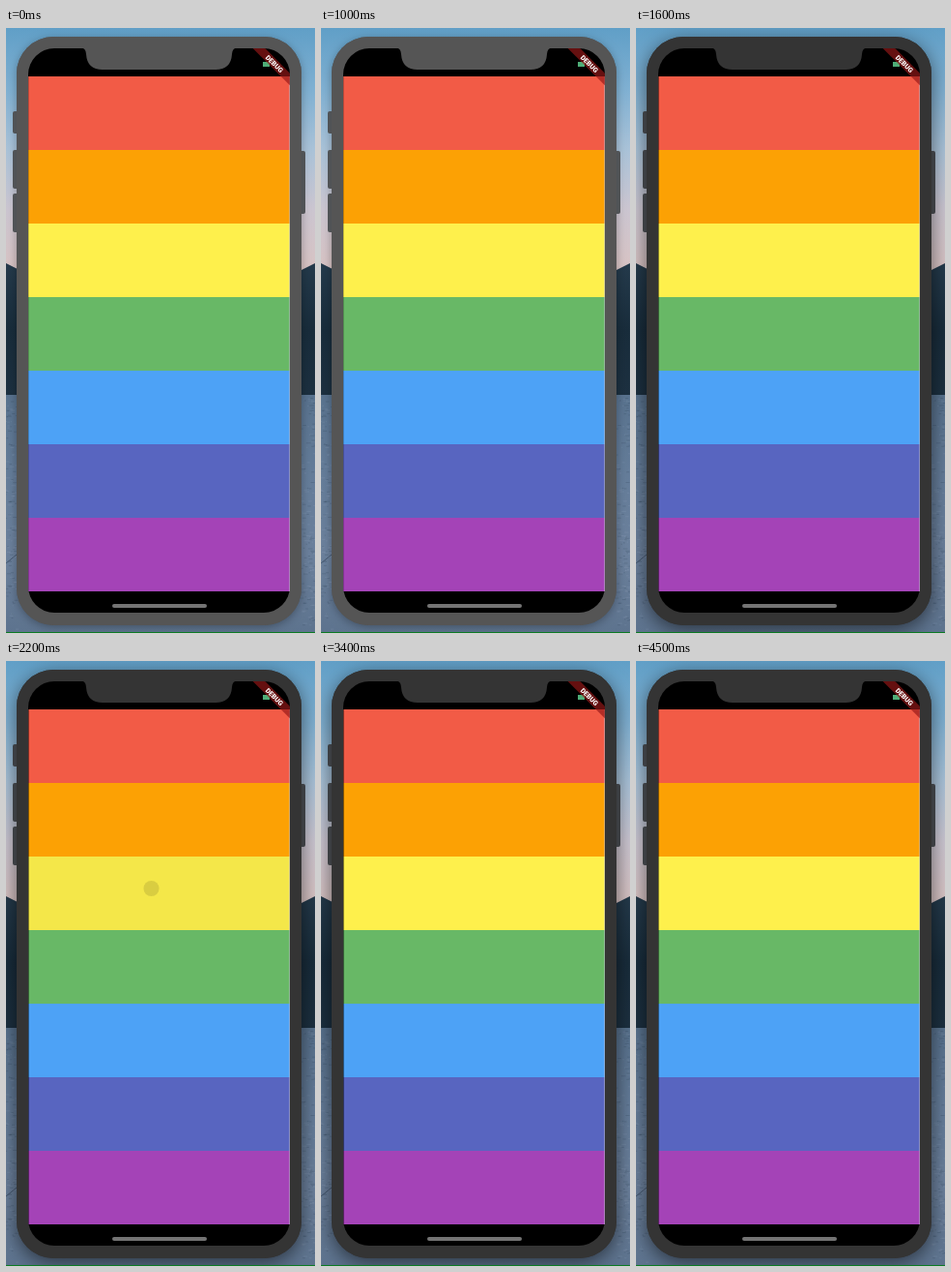
Recreate the animation shown at these times as an HTML page with a canvas. Size 320 by 625 pixels, loop 4600 ms.

```html
<!DOCTYPE html>
<html lang="en">
<head>
<meta charset="utf-8">
<title>Ripple bands</title>
<style>
  html, body { margin: 0; width: 100%; height: 100%; overflow: hidden; background: #000; }
  canvas { display: block; width: 320px; height: 625px; }
</style>
</head>
<body>
<canvas id="stage" width="320" height="625"></canvas>
<script>
const ctx = document.getElementById('stage').getContext('2d');
const LOOP = 4600, STEP = 100;
const SCREEN = { x: 23, y: 50, w: 271, h: 76 };
const COLORS = ['#f25b46', '#fca104', '#fef04c', '#68b866', '#4da2f6', '#5865c0', '#a443b7'];
const TAPS = [
  { band: 0, x: 150, y: 109, down: 1152, up: 1320 },
  { band: 2, x: 150.5, y: 235, down: 2146, up: 2290 }
];
const FOCUS_TIME = TAPS[0].down;
const clamp = v => Math.max(0, Math.min(1, v));

function rect(x, y, w, h, fill) {
  ctx.fillStyle = fill;
  ctx.fillRect(x, y, w, h);
}

function round(x, y, w, h, r, fill) {
  ctx.beginPath();
  ctx.roundRect(x, y, w, h, r);
  ctx.fillStyle = fill;
  ctx.fill();
}

function gradient(y0, y1, ...colors) {
  const g = ctx.createLinearGradient(0, y0, 0, y1);
  colors.forEach((c, i) => g.addColorStop(i / (colors.length - 1), c));
  return g;
}

function drawLandscape() {
  rect(0, 0, 320, 260, gradient(0, 250, '#609fc7', '#7fb0d2', '#a9c2d8', '#cbc5d0', '#d8c3c3'));
  ctx.beginPath();
  ctx.moveTo(0, 243);
  ctx.lineTo(14, 250);
  ctx.lineTo(304, 251);
  ctx.lineTo(320, 243);
  ctx.lineTo(320, 380);
  ctx.lineTo(0, 380);
  ctx.fillStyle = gradient(243, 380, '#243a4b', '#182c3b', '#1c3040');
  ctx.fill();
  rect(0, 379, 320, 246, gradient(379, 625, '#58728e', '#647c99', '#6b809c', '#5d738e'));
  // Fine grain on the ground
  let seed = 7;
  const rnd = () => (seed = seed * 16807 % 2147483647) / 2147483647;
  for (let i = 0; i < 260; i++) {
    const x = rnd() < 0.5 ? rnd() * 11 : 306 + rnd() * 14;
    rect(x - 1, 382 + rnd() * 240, 1 + rnd() * 4, 1,
      rnd() < 0.5 ? 'rgba(30,45,65,.16)' : 'rgba(180,195,215,.13)');
  }
  ctx.strokeStyle = 'rgba(35,50,70,.5)';
  ctx.beginPath();
  ctx.moveTo(0, 553);
  ctx.lineTo(11, 544);
  ctx.stroke();
}

function drawBody(focused) {
  const shell = focused ? '#343434' : '#555555';
  const button = focused ? '#3b3e42' : '#505356';
  ctx.save();
  ctx.shadowColor = focused ? 'rgba(0,0,0,.55)' : 'rgba(0,0,0,.3)';
  ctx.shadowBlur = focused ? 20 : 10;
  ctx.shadowOffsetY = focused ? 5 : 2;
  round(11, 9, 295, 608, 38, shell);
  ctx.restore();
  for (const [x, y, h] of [[7, 86, 23], [7, 126, 40], [7, 171, 40], [304, 127, 65]])
    round(x, y, 6, h, 2, button);
  round(11, 9, 295, 608, 38, shell);
  round(23, 21, 271, 583, 27, '#000');
  // Notch with flared shoulders
  ctx.beginPath();
  ctx.moveTo(77, 20);
  ctx.quadraticCurveTo(83, 21, 83, 27);
  ctx.quadraticCurveTo(84, 43, 100, 43);
  ctx.lineTo(217, 43);
  ctx.quadraticCurveTo(233, 43, 234, 27);
  ctx.quadraticCurveTo(234, 21, 240, 20);
  ctx.fillStyle = shell;
  ctx.fill();
  round(110, 595, 98, 4, 2, '#747474');
}

function drawTap({ band, x, y, down, up }, t) {
  const fade = 1 - clamp((t - up) / 200);
  if (t < down || !fade) return;
  const top = SCREEN.y + band * SCREEN.h;
  const reach = Math.hypot(
    Math.max(x - SCREEN.x, SCREEN.x + SCREEN.w - x),
    Math.max(y - top, top + SCREEN.h - y));
  const slow = reach * Math.min(t, up + 0) / 1000 - reach * down / 1000;
  const radius = slow + (reach - slow) * clamp((t - up) / 210);
  const pressed = clamp((t - down) / 200);
  ctx.save();
  ctx.beginPath();
  ctx.rect(SCREEN.x, top, SCREEN.w, SCREEN.h);
  ctx.clip();
  rect(SCREEN.x, top, SCREEN.w, SCREEN.h, `rgba(0,0,0,${0.145 * pressed * fade})`);
  ctx.beginPath();
  ctx.arc(x, y, radius, 0, 2 * Math.PI);
  ctx.fillStyle = `rgba(0,0,0,${0.11 * fade})`;
  ctx.fill();
  ctx.restore();
}

function drawBanner() {
  ctx.save();
  ctx.beginPath();
  ctx.roundRect(23, 21, 271, 583, 27);
  ctx.clip();
  rect(266, 35, 7, 5, '#4fae78');
  ctx.translate(278, 37);
  ctx.rotate(Math.PI / 4);
  rect(-40, -4.5, 80, 9, 'rgba(150,25,25,.68)');
  ctx.font = '900 7px Roboto, Arial, sans-serif';
  ctx.textAlign = 'center';
  ctx.textBaseline = 'middle';
  ctx.fillStyle = '#fff';
  ctx.fillText('DEBUG', 0, 0.5);
  ctx.restore();
}

function draw(t) {
  const focused = t >= FOCUS_TIME;
  drawLandscape();
  drawBody(focused);
  COLORS.forEach((c, i) => rect(SCREEN.x, SCREEN.y + i * SCREEN.h, SCREEN.w, SCREEN.h, c));
  TAPS.forEach(tap => drawTap(tap, t));
  rect(23, 50, 1, 532, focused ? 'rgba(0,0,0,.45)' : 'rgba(0,0,0,.2)');
  rect(293, 50, 1, 532, 'rgba(190,190,205,.5)');
  drawBanner();
  rect(0, 624, 320, 1, '#0b7a22');
}

const start = performance.now();
function tick() {
  const t = (performance.now() - start) % LOOP;
  draw(Math.floor(t / STEP) * STEP);
  requestAnimationFrame(tick);
}
tick();
</script>
</body>
</html>
```
